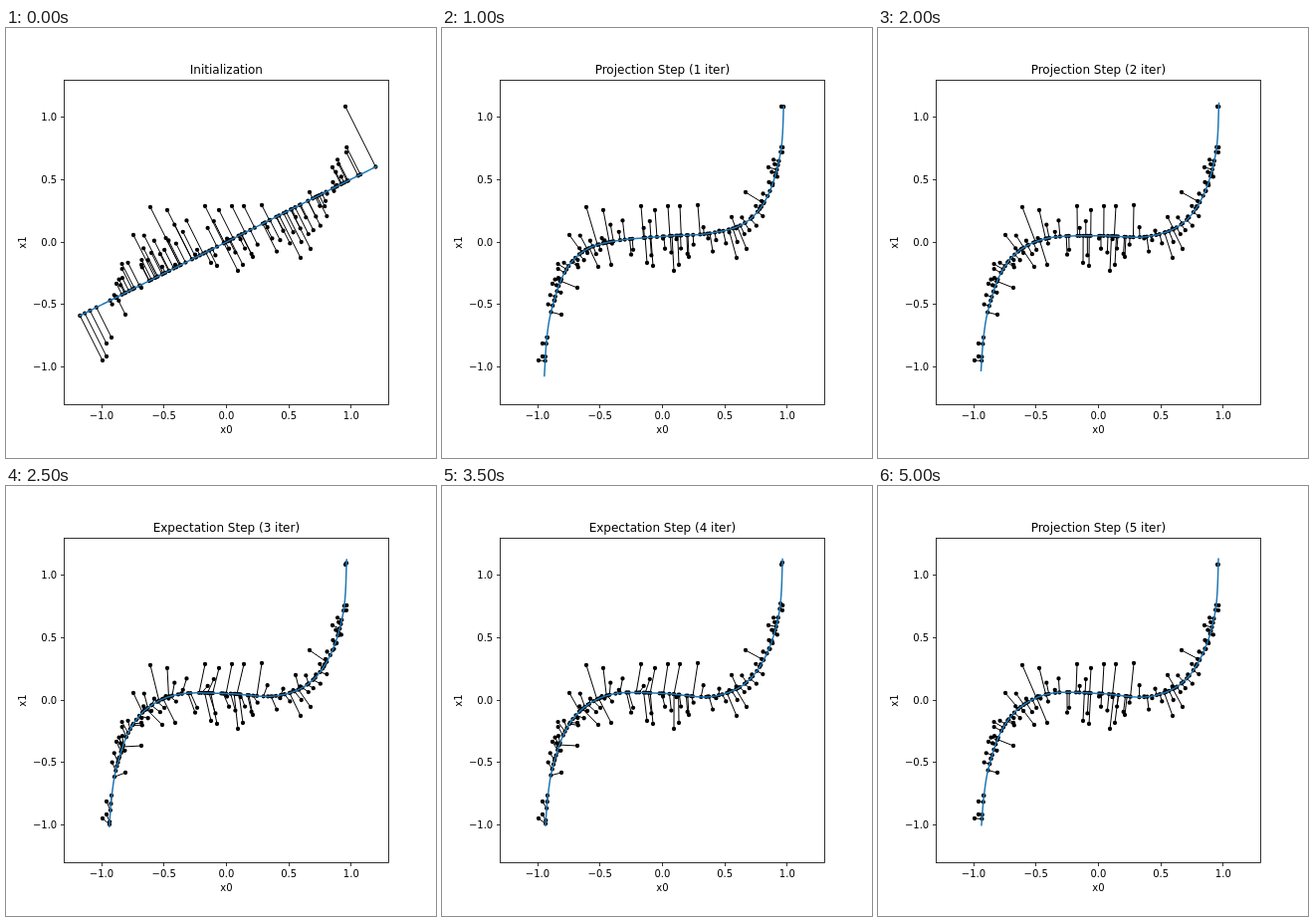
Recreate the animation shown at these times as an HTML page. Size 432 by 432 pixels, loop 5.5 s.

```html
<!DOCTYPE html>
<html>
<head>
<meta charset="utf-8">
<style>
html, body { margin: 0; width: 100%; height: 100%; overflow: hidden; background: #fff; }
svg { display: block; width: 432px; height: 432px; }
text { font: 10px "DejaVu Sans", sans-serif; text-anchor: middle; }
#title { font-size: 12px; }
path, rect { fill: none; stroke: #000; }
#axes, rect { stroke-width: .8; }
#dots { stroke-width: 4.3; stroke-linecap: round; }
#curve { stroke: #1f77b4; stroke-width: 1.5; stroke-linecap: square; stroke-linejoin: round; }
</style>
</head>
<body>
<svg id="plot" viewBox="0 0 432 432">
  <path id="dots"/><path id="links"/><path id="curve"/>
  <path id="axes"/>
  <rect x="58.5" y="52.5" width="326" height="326"/>
  <text id="title" x="221.4" y="46"></text>
  <text x="221.4" y="407">x0</text>
  <text transform="translate(20 215.5) rotate(-90)">x1</text>
</svg>
<script>
const SAMPLES = 1500, STEP_MS = 500, ITERATIONS = 5, POINTS = 66;
const $ = id => document.getElementById(id);
const noise = i => {
  const v = Math.sin(i * 12.9898 + 4) * 43758.5453;
  return 2 * (v - Math.floor(v)) - 1;
};

// Knots of the curve the fit settles on.
const settled = [
  [104, 340.5], [106.5, 311], [111.5, 282], [124, 246], [144, 221.5], [175, 208],
  [224, 208.5], [270, 212], [304, 199], [326, 169], [339, 125], [342, 73]
];

// Earlier fits are flatter in the middle and reach lower at the left.
function fit(k) {
  const w = .42 ** k, end = settled.length - 1;
  return spline(settled.map(([x, y], i) => {
    const u = Math.max(-1, Math.min(1, (x - 228) / 95));
    const tip = i == 0 ? 9 : i == end ? 6 : 0;
    return [x + .01 * w * (x - 221), y + w * (tip - 6 * Math.sin(Math.PI * u))];
  }));
}

// Catmull-Rom spline sampled evenly over its knots.
function spline(knots) {
  const end = knots.length - 1;
  const at = i => knots[Math.max(0, Math.min(end, i))];
  return Array.from({ length: SAMPLES + 1 }, (_, n) => {
    const u = n / SAMPLES * end, k = Math.min(end - 1, Math.floor(u)), t = u - k;
    const [a, b, c, d] = [-1, 0, 1, 2].map(o => at(k + o));
    return [0, 1].map(j => b[j] + t / 2 * (c[j] - a[j]
      + t * (2 * a[j] - 5 * b[j] + 4 * c[j] - d[j]
      + t * (3 * (b[j] - c[j]) + d[j] - a[j]))));
  });
}

const axis = spline([[74.3, 289], [372, 139.2]]);
const curves = Array.from({ length: ITERATIONS }, (_, k) => fit(k));

// The outermost observations; the others scatter across the settled curve.
const data = [
  [97, 334], [101, 330], [101, 317], [106, 311], [120, 288], [136, 261], [111, 257],
  [128, 208], [145, 180], [162, 183], [157, 240], [170, 238], [200, 179], [214, 183],
  [206, 236], [212, 239], [227, 179], [239, 179], [233, 244], [238, 238], [257, 178],
  [248, 230], [291, 190], [296, 231], [306, 222], [305, 165], [328, 140], [341, 79]
];
for (let i = 0; i < POINTS; i++) {
  const t = .19 + .74 * (i + .4 * noise(i)) / POINTS;
  const n = Math.round(t * SAMPLES), curve = curves[ITERATIONS - 1];
  const [x, y] = curve[n], [x2, y2] = curve[n + 1];
  const spread = (5 + 16 * Math.sin(Math.PI * t) ** 4) * noise(i + 100) / Math.hypot(x2 - x, y2 - y);
  data.push([x - (y2 - y) * spread, y + (x2 - x) * spread]);
}

function argmin(curve, cost) {
  let best = 0, low = Infinity;
  curve.forEach((p, i) => {
    const c = cost(p);
    if (c < low) { low = c; best = i; }
  });
  return best;
}

const project = curve => data.map(([x, y]) =>
  argmin(curve, p => (p[0] - x) ** 2 + (p[1] - y) ** 2));

// Same position along the straight axis, moved onto the curve.
const slide = curve => data.map(([x, y]) =>
  argmin(curve, p => Math.abs((p[0] - x) * .893 - (p[1] - y) * .45)));

// Spread the previous positions over the whole new curve.
function stretch(feet) {
  const lo = Math.min(...feet), hi = Math.max(...feet);
  return feet.map(i => Math.round(SAMPLES * (.01 + .98 * (i - lo) / (hi - lo))));
}

const xy = p => p.map(v => v.toFixed(2)).join(" ");

function scene(title, curve, feet) {
  const ends = feet.map(i => curve[i]);
  return {
    title,
    curve: "M" + curve.filter((_, i) => i % 10 == 0).map(xy).join("L"),
    links: data.map((p, i) => `M${xy(p)}L${xy(ends[i])}`).join(""),
    dots: [...data, ...ends].map(p => `M${xy(p)}h.01`).join("")
  };
}

let feet = project(axis);
const scenes = [scene("Initialization", axis, feet)];
curves.forEach((curve, k) => {
  const moved = k ? stretch(feet) : slide(curve);
  feet = project(curve);
  scenes.push(scene(`Expectation Step (${k + 1} iter)`, curve, moved),
              scene(`Projection Step (${k + 1} iter)`, curve, feet));
});

function label(x, y, str, anchor) {
  const t = document.createElementNS("http://www.w3.org/2000/svg", "text");
  t.setAttribute("x", x);
  t.setAttribute("y", y);
  t.style.textAnchor = anchor;
  t.textContent = str;
  $("plot").append(t);
}

let ticks = "";
for (let v = -1; v <= 1; v += .5) {
  const x = 221.4 + 125.4 * v, y = 215.1 - 125.4 * v;
  const str = v.toFixed(1).replace("-", "\u2212");
  ticks += `M${Math.floor(x) + .5} 378.5v3.5M58.5 ${Math.floor(y) + .5}h-3.5`;
  label(x, 393.4, str, "middle");
  label(51.2, y + 3.4, str, "end");
}
$("axes").setAttribute("d", ticks);

let shown = -1;
function draw() {
  const n = Math.floor(performance.now() / STEP_MS) % scenes.length;
  if (n != shown) {
    shown = n;
    $("title").textContent = scenes[n].title;
    for (const id of ["dots", "links", "curve"]) $(id).setAttribute("d", scenes[n][id]);
  }
  requestAnimationFrame(draw);
}
draw();
</script>
</body>
</html>
```
